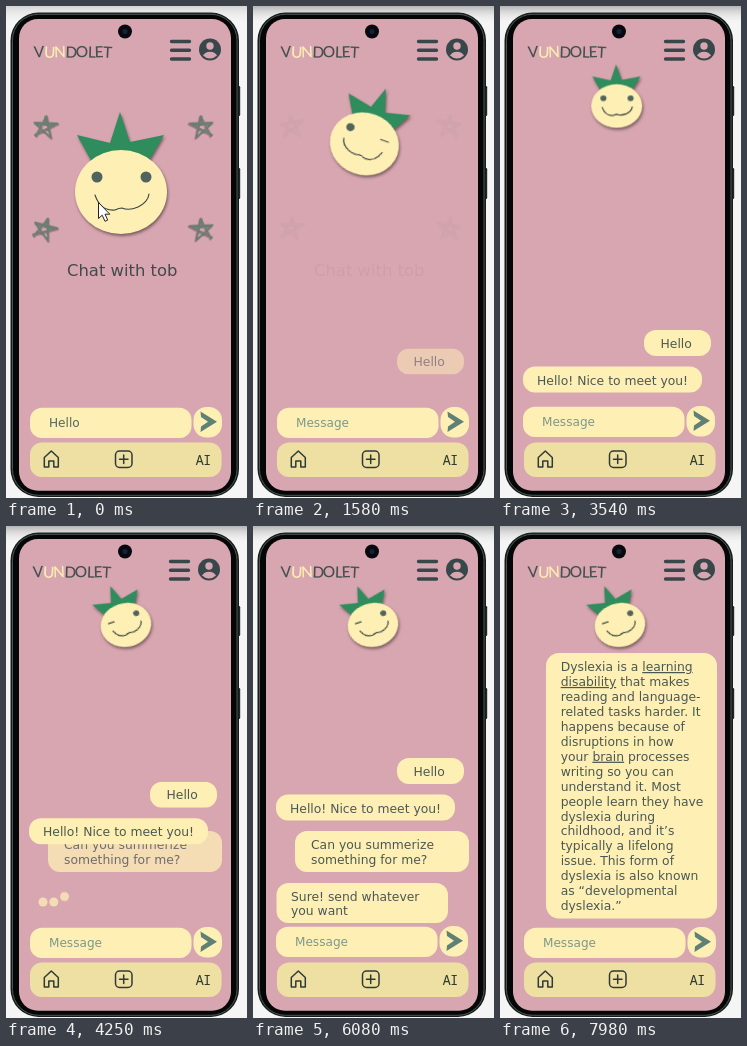
These frames come from a looping animation (241x492 px, 8 s). An HTML page:

```html
<!DOCTYPE html>
<html lang="en">
<head>
<meta charset="utf-8">
<title>Chat prototype</title>
<style>
  html, body { margin: 0; width: 100%; height: 100%; overflow: hidden; background: #f5f5f5; }
  svg { display: block; width: 100%; height: 100%; }
  text { font: 12.35px "DejaVu Sans", Verdana, sans-serif; fill: #4a5853; }
  .logo { font: 500 15.5px Lato, "Open Sans", sans-serif; letter-spacing: -.9px; fill: #45504f; }
  .logo .lit { fill: #fdeeb2; }
  .title { font-size: 16.4px; fill: #414b4a; }
  .field { font-size: 12.1px; fill: #53665e; }
  .hint { fill: #7f978a; }
  .ai { font: 14px "Noto Sans Mono", "DejaVu Sans Mono", monospace; letter-spacing: -.8px; fill: #2f3a38; }
  .u { text-decoration: underline; }
  .cream { fill: #fef0b5; }
  .line { fill: none; stroke: #2f3a38; stroke-width: 1.5; stroke-linejoin: round; stroke-linecap: round; }
  .thin { fill: none; stroke: #3a4440; stroke-width: 1.15; stroke-linecap: round; vector-effect: non-scaling-stroke; }
  .eye { fill: #50645d; }
  .scrawl { fill: none; stroke: #6b7d73; stroke-width: 1.9; stroke-linejoin: round; stroke-linecap: round; }
  .shadow { filter: drop-shadow(1.5px 2px 1.5px rgba(40, 30, 30, .55)); }
  .soft { filter: drop-shadow(1px 1.5px .6px rgba(60, 40, 50, .35)); }

  .a { animation: 8s linear infinite both; }
  .cut { animation-timing-function: step-end; }

  /* mascot */
  .place { animation-name: place; }
  @keyframes place {
    0%, 16% { transform: translate(115px, 186px); animation-timing-function: ease-out; }
    26%, 100% { transform: translate(116.7px, 100px) scale(.555, .52); }
  }
  .smile { animation-name: smile; }
  @keyframes smile {
    0%, 7.25%, 20%, 32.5%, 44.25%, 58.6%, 68.6%, 83.2%, 92.2% { opacity: 1; }
    1.87%, 10.8%, 25.4%, 37.1%, 51.5%, 62.1%, 76%, 87%, 96.1%, 100% { opacity: 0; }
  }
  .right { animation-name: right; }
  @keyframes right {
    1.87%, 10.8%, 25.4%, 37.1%, 51.5%, 62.1%, 76%, 87%, 96.1%, 100% { opacity: 1; }
    0%, 5.62%, 14.6%, 28.7%, 40.5%, 55%, 65.5%, 79.7%, 88.7% { opacity: 0; }
  }
  .left { animation-name: left; }
  @keyframes left {
    5.62%, 14.6%, 28.7%, 40.5%, 55%, 65.5%, 79.7%, 88.7% { opacity: 1; }
    0%, 7.25%, 20%, 32.5%, 44.25%, 58.6%, 68.6%, 83.2%, 92.2%, 100% { opacity: 0; }
  }

  /* opening screen */
  .shade { animation-name: shade; }
  @keyframes shade { 0% { opacity: .5; } 16.5%, 100% { opacity: 1; } }
  .intro { animation-name: intro; }
  @keyframes intro { 0%, 16.4% { opacity: 1; } 20%, 100% { opacity: 0; } }
  .wiggle { animation: wiggle calc(8s / 14) step-end infinite; }
  @keyframes wiggle { 0% { transform: rotate(7deg); } 50% { transform: translate(-.5px, -1px) rotate(-5deg); } }
  .pointer { animation-name: pointer; }
  @keyframes pointer {
    0% { transform: none; opacity: 1; }
    10.8%, 16.4% { transform: translate(8px, 35px); opacity: 1; }
    16.5%, 100% { transform: translate(8px, 35px); opacity: 0; }
  }
  .before { animation-name: before; }
  @keyframes before { 0% { opacity: 1; } 16.5%, 100% { opacity: 0; } }
  .after { animation-name: after; }
  @keyframes after { 0% { opacity: 0; } 16.5%, 100% { opacity: 1; } }

  /* conversation */
  .thread { animation-name: thread; }
  @keyframes thread { 0%, 82.5% { opacity: 1; } 87.5%, 100% { opacity: 0; } }
  .lift { animation-name: lift; }
  @keyframes lift {
    0%, 48% { transform: translateY(92px); animation-timing-function: ease-out; }
    57.25%, 100% { transform: none; }
  }
  .hello { animation-name: hello; }
  @keyframes hello {
    0%, 16.5% { transform: translateY(37px); opacity: 0; animation-timing-function: ease-out; }
    26%, 100% { transform: none; opacity: 1; }
  }
  .nice { animation-name: nice; }
  @keyframes nice { 0%, 36.9% { opacity: 0; } 40.5%, 100% { opacity: 1; } }
  .ask { animation-name: ask; }
  @keyframes ask {
    0%, 48% { opacity: 0; animation-timing-function: ease-out; }
    57.25%, 100% { opacity: 1; }
  }
  .sure { animation-name: sure; }
  @keyframes sure { 0%, 68.7% { opacity: 0; } 72.4%, 100% { opacity: 1; } }
  .answer { animation-name: answer; }
  @keyframes answer { 0%, 82.5% { opacity: 0; } 87.5%, 100% { opacity: 1; } }

  /* typing dots */
  .wait1 { animation-name: wait1; }
  @keyframes wait1 { 0%, 25% { opacity: 0; } 29%, 36.9% { opacity: 1; } 40%, 100% { opacity: 0; } }
  .wait2 { animation-name: wait2; }
  @keyframes wait2 {
    0%, 48% { opacity: 0; animation-timing-function: ease-out; }
    57.25%, 68.7% { opacity: 1; }
    72%, 100% { opacity: 0; }
  }
  .d1 { animation-name: d1; }
  @keyframes d1 { 0% { transform: none; } 30.1% { transform: translateY(-5px); } 31.9%, 100% { transform: none; } }
  .d2 { animation-name: d2; }
  @keyframes d2 { 0% { transform: none; } 31.9% { transform: translateY(-5px); } 33.7%, 100% { transform: none; } }
  .d3 { animation-name: d3; }
  @keyframes d3 { 0% { transform: none; } 33.7%, 100% { transform: translateY(-5.5px); } }
  .hop { animation: hop calc(8s / 14) step-end infinite; animation-delay: calc(-36ms + var(--i) * 143ms); }
  @keyframes hop { 0% { transform: translateY(-5.5px); } 25%, 100% { transform: none; } }

  /* one-pixel jumps between screens */
  .head { animation-name: head; }
  @keyframes head { 0% { transform: none; } 48% { transform: translateX(-1px); } 72.4%, 100% { transform: none; } }
  .nudge { animation-name: nudge; }
  @keyframes nudge {
    0%, 48%, 99.7%, 100% { transform: none; }
    28.75%, 72.4% { transform: translate(-1px, -1px); }
  }
</style>
</head>
<body>
<svg viewBox="0 0 241 492" preserveAspectRatio="none">
  <defs>
    <linearGradient id="shade" x2="0" y2="1">
      <stop stop-color="#b4b4b4"/><stop offset="1" stop-color="#f5f5f5" stop-opacity="0"/>
    </linearGradient>
    <g id="head">
      <path d="M-44-57L-11-49L-1-80L9-50L43-57L26-28L-28-28Z" fill="#2f8c5c"/>
      <ellipse rx="46" ry="42" class="cream"/>
      <path class="thin" d="M-26 3C-22 15-14 19-6 18Q-2 16 1 16Q8 19 17 15Q27 10 28 2"/>
      <circle class="eye" cx="25" cy="-15" r="5.5"/>
    </g>
    <g id="wink">
      <use href="#head"/>
      <path class="thin" d="M-29-13L-18-13"/>
    </g>
    <g id="star" class="scrawl soft">
      <path d="M-8 10L0-11L7 10L-11-3L12-5L-9 9M-1-10L6 7M-10-2L10-4"/>
    </g>
  </defs>

  <rect width="241" height="492" fill="#f5f5f5"/>
  <rect class="a cut shade" width="241" height="18" fill="url(#shade)"/>

  <!-- phone -->
  <rect x="231" y="80" width="3.2" height="30" rx="1.2" fill="#202726"/>
  <rect x="231" y="162" width="3.2" height="31" rx="1.2" fill="#202726"/>
  <rect x="4.5" y="6.5" width="228.5" height="484.5" rx="28" fill="#161c1b"/>
  <rect x="6.5" y="8.3" width="224.5" height="481" rx="26" fill="#050707" stroke="#4d5654"/>
  <rect x="13" y="13" width="212" height="471.7" rx="19" fill="#d8a6b1"/>
  <circle cx="119" cy="25.5" r="7" fill="#08090c"/>
  <circle cx="119" cy="25.5" r="2.6" fill="#14203c"/>

  <!-- header -->
  <g class="a cut head">
    <text class="logo" x="28" y="51.5" rotate="-3 3 -2 2 -3 2 -2 3">V<tspan class="lit">UN</tspan>DOLET</text>
    <path d="M165.5 35.5h18M165.5 44.3h18M165.5 53h18" stroke="#38474a" stroke-width="3.4" stroke-linecap="round"/>
    <circle cx="204" cy="43.5" r="11" fill="#38474a"/>
    <circle cx="204" cy="40" r="3.7" fill="#d8a6b1"/>
    <path d="M197 49.5Q199 45.7 204 45.7T211 49.5Q208 52.4 204 52.4T197 49.5Z" fill="#d8a6b1"/>
  </g>

  <!-- opening screen -->
  <g class="a intro">
    <g transform="translate(39 121)"><g class="wiggle"><use href="#star"/></g></g>
    <g transform="translate(196 121) scale(-1 1)"><g class="wiggle"><use href="#star"/></g></g>
    <g transform="translate(38.5 223) rotate(12)"><g class="wiggle"><use href="#star"/></g></g>
    <g transform="translate(196 223.5) scale(-1 1)"><g class="wiggle"><use href="#star"/></g></g>
    <text class="title" x="61" y="270">Chat with tob</text>
  </g>

  <!-- conversation -->
  <g class="a thread">
    <g class="a ask">
      <rect class="cream" x="42" y="305" width="174" height="41" rx="12"/>
      <text x="58" y="323">Can you summerize<tspan x="58" dy="14.5">something for me?</tspan></text>
    </g>
    <g class="a lift">
      <g class="a hello">
        <rect class="cream" x="144" y="232" width="67" height="26" rx="12"/>
        <text x="160.5" y="249.5">Hello</text>
      </g>
      <g class="a nice">
        <rect class="cream" x="23" y="268.5" width="179" height="26" rx="12"/>
        <text x="37" y="286.5">Hello! Nice to meet you!</text>
      </g>
    </g>
    <g class="a sure">
      <rect class="cream" x="23.5" y="357" width="171.5" height="40" rx="12"/>
      <text x="38" y="374.5">Sure! send whatever<tspan x="38" dy="14.5">you want</tspan></text>
    </g>
  </g>
  <g class="a wait1">
    <circle class="cream a cut d1" cx="42" cy="379.5" r="4.5"/>
    <circle class="cream a cut d2" cx="52.7" cy="379.5" r="4.5"/>
    <circle class="cream a cut d3" cx="63.3" cy="379.5" r="4.5"/>
  </g>
  <g class="a wait2">
    <circle class="cream hop" style="--i:0" cx="37" cy="376" r="4.5"/>
    <circle class="cream hop" style="--i:1" cx="47.8" cy="376" r="4.5"/>
    <circle class="cream hop" style="--i:2" cx="58.5" cy="376" r="4.5"/>
  </g>
  <g class="a answer"><g class="a cut nudge">
    <rect class="cream" x="46" y="127" width="171" height="265.5" rx="13"/>
    <text y="145">
      <tspan x="60.7">Dyslexia is a <tspan class="u">learning</tspan></tspan>
      <tspan x="60.7" dy="14.95"><tspan class="u">disability</tspan> that makes</tspan>
      <tspan x="60.7" dy="14.95">reading and language-</tspan>
      <tspan x="60.7" dy="14.95">related tasks harder. It</tspan>
      <tspan x="60.7" dy="14.95">happens because of</tspan>
      <tspan x="60.7" dy="14.95">disruptions in how</tspan>
      <tspan x="60.7" dy="14.95">your <tspan class="u">brain</tspan> processes</tspan>
      <tspan x="60.7" dy="14.95">writing so you can</tspan>
      <tspan x="60.7" dy="14.95">understand it. Most</tspan>
      <tspan x="60.7" dy="14.95">people learn they have</tspan>
      <tspan x="60.7" dy="14.95">dyslexia during</tspan>
      <tspan x="60.7" dy="14.95">childhood, and it’s</tspan>
      <tspan x="60.7" dy="14.95">typically a lifelong</tspan>
      <tspan x="60.7" dy="14.95">issue. This form of</tspan>
      <tspan x="60.7" dy="14.95">dyslexia is also known</tspan>
      <tspan x="60.7" dy="14.95">as “developmental</tspan>
      <tspan x="60.7" dy="14.95">dyslexia.”</tspan>
    </text>
  </g></g>

  <!-- mascot -->
  <g class="shadow">
    <g class="a place">
      <g class="a cut smile">
        <use href="#head"/>
        <circle class="eye" cx="-24" cy="-15" r="5.5"/>
      </g>
      <g class="a cut right"><use href="#wink" transform="translate(6 -2) rotate(-20)"/></g>
      <g class="a cut left"><use href="#wink" transform="scale(-1 1) translate(6 -2) rotate(-20)"/></g>
    </g>
  </g>

  <!-- message field and navigation -->
  <g class="a cut nudge">
    <rect class="cream" x="24" y="401.7" width="161.5" height="30.3" rx="12"/>
    <text class="field a cut before" x="43" y="421.3">Hello</text>
    <text class="field hint a cut after" x="43" y="421.3">Message</text>
    <rect class="cream" x="187.5" y="401" width="28.5" height="30.5" rx="13"/>
    <path d="M194.5 405.5L211 415.7L194.5 426L195 420.5L202 415.7L195 411Z" fill="#5f8074"/>
  </g>
  <rect x="24" y="436.5" width="191.5" height="34.5" rx="12" fill="#eee0a2"/>
  <path class="line" stroke-width="1.2" d="M38.3 451.5L45.3 445L52.3 451.5V461H47.8V455H42.8V461H38.3Z"/>
  <rect class="line" x="109.5" y="445" width="16.5" height="16.5" rx="4"/>
  <path class="line" d="M117.7 449v8.5M113.5 453.2h8.5"/>
  <text class="ai" x="189.5" y="458.5">AI</text>

  <path class="a pointer" d="M92.5 196.5V212.5L96.2 209.2L99 215.3L101.7 214.1L99 208.2H103.8Z"
        fill="#fff" stroke="#222"/>
</svg>
</body>
</html>
```
